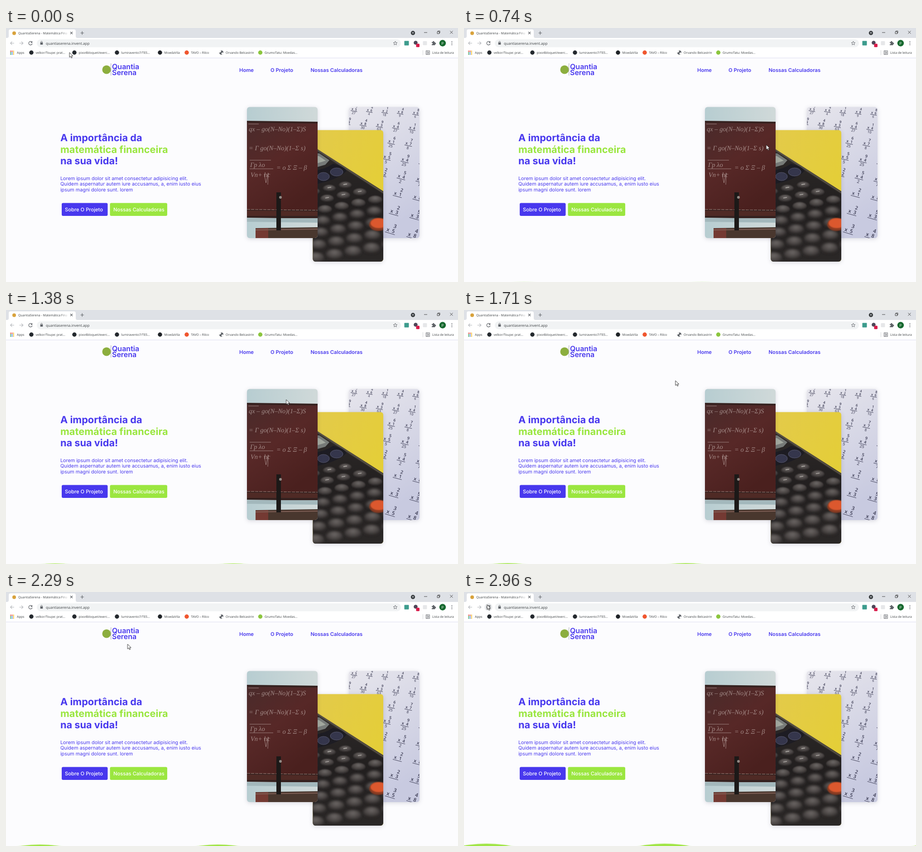
Write an HTML page that moves like this. It is 998x561 px and loops after 3010 ms.

```html
<!DOCTYPE html>
<html lang="pt-BR">
<head>
<meta charset="utf-8">
<title>QuantiaSerena</title>
<style>
  html, body { margin: 0; width: 100%; height: 100%; overflow: hidden; background: #fcfcfe; }
  svg { display: block; width: 998px; height: 561px; }
  text { text-rendering: geometricPrecision; }
  .ui { font: 7px "Open Sans", "Noto Sans", sans-serif; fill: #3c4043; }
  .site { font-family: Inter, "Open Sans", sans-serif; fill: #4838ee; }
  .nav { font-size: 11.25px; font-weight: 600; }
  .title { font-size: 21.75px; font-weight: 700; }
  .body { font-size: 10.8px; }
  .btn { font-size: 11.2px; font-weight: 500; fill: #fff; }
  .brand { font-size: 16px; font-weight: 600; }
  .chalk { font: italic 14.5px "Liberation Serif", "Noto Serif", serif; fill: #d0c0bc; opacity: .65; }
  .sum { font-family: "Open Sans", "Noto Sans", sans-serif; font-weight: 600; fill: #3a3a52; }
  .line { fill: none; stroke: #5f6368; stroke-width: 1.2; }
  .photo { filter: drop-shadow(0 2px 5px rgba(30, 30, 60, .16)); }
</style>
</head>
<body>
<svg viewBox="0 0 998 561">
  <defs>
    <clipPath id="boardClip"><rect x="532" y="174.5" width="156" height="289.5" rx="6"/></clipPath>
    <clipPath id="calcClip"><rect x="677.5" y="225.5" width="155.5" height="290.5" rx="6"/></clipPath>
    <clipPath id="paperClip"><rect x="757" y="174.5" width="156" height="289.5" rx="6"/></clipPath>
    <linearGradient id="wall" x2="1"><stop stop-color="#b7cdd1"/><stop offset="1" stop-color="#d0d9d9"/></linearGradient>
    <linearGradient id="board" x2=".6" y2="1">
      <stop stop-color="#4a2b2b"/><stop offset=".5" stop-color="#572827"/><stop offset="1" stop-color="#4a201e"/>
    </linearGradient>
    <linearGradient id="paper" x2=".3" y2="1"><stop stop-color="#e6e5ec"/><stop offset="1" stop-color="#c8cae0"/></linearGradient>
    <linearGradient id="yellow" x2="1" y2="1"><stop stop-color="#e3ca4b"/><stop offset="1" stop-color="#e5d02f"/></linearGradient>
    <linearGradient id="shell" x2="0" y2="1">
      <stop stop-color="#2e2a29"/><stop offset=".5" stop-color="#221f1f"/><stop offset="1" stop-color="#2b2827"/>
    </linearGradient>
    <radialGradient id="key" cy=".3" r=".7"><stop stop-color="#6d6866"/><stop offset=".6" stop-color="#474241"/><stop offset="1" stop-color="#201d1d"/></radialGradient>
    <linearGradient id="fade" x2="1"><stop stop-color="#fff" stop-opacity="0"/><stop offset="1" stop-color="#fff"/></linearGradient>
    <filter id="soft" x="-30%" y="-30%" width="160%" height="160%"><feGaussianBlur stdDeviation="1"/></filter>
    <filter id="softer" x="-40%" y="-40%" width="180%" height="180%"><feGaussianBlur stdDeviation="2.4"/></filter>
    <filter id="glow" x="-10%" y="-60%" width="120%" height="220%"><feGaussianBlur stdDeviation="1.1"/></filter>
    <path id="hump" d="M-80 11Q0-11 80 11V20H-80Z"/>
  </defs>

  <rect width="998" height="561" fill="#fcfcfe"/>

  <!-- site header -->
  <circle cx="222" cy="92" r="9.5" fill="#8cae3e"/>
  <path d="M231.8 78V105" stroke="#a9a9b8"/>
  <g class="site brand"><text x="234" y="91">Quantia</text><text x="234" y="104.3">Serena</text></g>
  <g class="site nav">
    <text x="515" y="97">Home</text><text x="584" y="97">O Projeto</text><text x="672.5" y="97">Nossas Calculadoras</text>
  </g>

  <!-- introduction -->
  <g class="site title">
    <text x="120" y="250.3">A importância da</text>
    <text x="120" y="275.5" fill="#99e63e">matemática financeira</text>
    <text x="120" y="300.5">na sua vida!</text>
  </g>
  <g class="site body">
    <text x="120" y="336">Lorem ipsum dolor sit amet consectetur adipisicing elit.</text>
    <text x="120" y="348.3">Quidem aspernatur autem iure accusamus, a, enim iusto eius</text>
    <text x="120" y="360.5">ipsum magni dolore sunt. lorem</text>
  </g>
  <rect x="123" y="386.5" width="101.5" height="28.5" rx="3" fill="#4838ee"/>
  <rect x="229.5" y="386.5" width="126.5" height="28.5" rx="3" fill="#9be640"/>
  <text class="site btn" x="130" y="405.2">Sobre O Projeto</text>
  <text class="site btn" x="237" y="405.2">Nossas Calculadoras</text>

  <!-- sheet of sums -->
  <g class="photo"><g clip-path="url(#paperClip)">
    <rect x="757" y="174" width="156" height="290" fill="url(#paper)"/>
    <g id="sums"></g>
  </g></g>

  <!-- calculator -->
  <g class="photo"><g clip-path="url(#calcClip)">
    <rect x="677" y="225" width="157" height="291" fill="url(#yellow)"/>
    <path d="M677 262L688 268L840 365V520H677Z" fill="url(#shell)"/>
    <path d="M677 263L688 270L840 368" fill="none" stroke="#6b6355" stroke-width="2.5" filter="url(#soft)"/>
    <path d="M677 276L692 277L714 292L705 302L677 310Z" fill="#777b78"/>
    <path d="M677 282L691 283L706 293L677 302Z" fill="#a3a99f"/>
    <path d="M677 316Q705 312 722 300Q745 304 752 316Q728 338 677 346Z" fill="#1d1c23"/>
    <g fill="#35364c" stroke="#62647a" stroke-width=".8">
      <ellipse cx="701" cy="328" rx="13" ry="9"/><ellipse cx="730" cy="318" rx="14" ry="9"/>
    </g>
    <g id="keys"></g>
    <ellipse cx="822" cy="434" rx="20" ry="14" fill="#8a3a20" filter="url(#soft)"/>
    <ellipse cx="823" cy="431" rx="18" ry="11" fill="#dc592d" filter="url(#soft)"/>
  </g></g>

  <!-- blackboard -->
  <g class="photo"><g clip-path="url(#boardClip)">
    <rect x="532" y="174" width="156" height="290" fill="url(#wall)"/>
    <path d="M532 205L688 207V421L532 419Z" fill="#35211f"/>
    <path d="M532 209L688 211V401H532Z" fill="url(#board)"/>
    <path d="M532 400.5L688 402.5" stroke="#94736c" stroke-width="1.2" stroke-dasharray="7 2"/>
    <path d="M532 403L688 405V415H532Z" fill="#4f2a25"/>
    <path d="M532 420H688V430L532 428Z" fill="#a3b8bc"/>
    <path d="M551 442L688 440V464H551Z" fill="#49372e"/>
    <path d="M551 443L579 442V464H551Z" fill="#743a33"/>
    <path d="M551 446L688 444" stroke="#816057" stroke-width="2"/>
    <path d="M597 363H607V447H597Z" fill="#1c1918"/>
    <circle cx="606" cy="374" r="3" fill="#918984"/>
    <g class="chalk">
      <text x="536" y="228">qx – go(N–No)(1–Σ)S</text>
      <text x="536" y="270">= Γ go(N–No)(1–Σ s)</text>
      <text x="539" y="307">Γp λo</text><text x="540" y="329">Vn+ hc</text>
      <text x="597" y="313">= o  Σ Ξ  – β</text>
    </g>
    <path d="M535 212H558M538 292H585M538 311H590M570 322L574 342L579 320L578 346" fill="none" stroke="#d0c0bc" opacity=".6"/>
  </g></g>

  <!-- wave at the foot -->
  <g id="wave" fill="#a0e545"></g>

  <!-- browser frame -->
  <rect width="998" height="22" fill="#dee1e6"/>
  <rect y="22" width="998" height="44" fill="#fff"/>
  <path d="M0 66.2H998" stroke="#dcdcf0"/>
  <path d="M2 22Q6 22 6 18V7Q6 3 10 3H150Q154 3 154 7V18Q154 22 158 22Z" fill="#fff"/>
  <circle cx="18" cy="11.5" r="4" fill="#d8a23c"/>
  <text class="ui" x="27" y="13.7">QuantiaSerena - Matemática Fina</text>
  <rect x="121" y="5" width="17" height="14" fill="url(#fade)"/>
  <path class="line" d="M142 8.5L147 13.5M147 8.5L142 13.5M164.5 11H172M168.2 7.2V14.8"/>
  <circle cx="898.5" cy="11" r="4.7" fill="#3c4043"/>
  <path d="M896.3 9.8H900.7L898.5 12.6Z" fill="#dee1e6"/>
  <g fill="none" stroke="#333" stroke-width=".9">
    <path d="M923 10H930M980.5 6.5L986.5 12.5M986.5 6.5L980.5 12.5"/>
    <path d="M952.2 8.2H956.6V12.6H952.2ZM953.6 8V6.6H958V11H956.8"/>
  </g>

  <circle id="hover" cx="54" cy="33.5" r="8.5" fill="#e6e8ea" opacity="0"/>
  <path class="line" d="M18 33.5H10M13.5 29.8L9.8 33.5L13.5 37.2M29.5 33.5H37.5M34 29.8L37.7 33.5L34 37.2" style="stroke:#b4b7bb"/>
  <path class="line" d="M57 31A3.9 3.9 0 1 0 57.9 34.5"/>
  <path d="M58.2 28.8V32.8H54.2Z" fill="#5f6368"/>
  <rect x="68" y="25" width="804" height="17.5" rx="8.7" fill="#f1f3f4"/>
  <rect x="75.7" y="32" width="5.6" height="4.8" rx=".6" fill="#5f6368"/>
  <path class="line" d="M76.9 32V30.8A1.6 1.6 0 0 1 80.1 30.8V32" style="stroke-width:.9"/>
  <text class="ui" x="88" y="36.5" style="font-size:8.1px">quantiaserena.invent.app</text>
  <path class="line" id="star" style="stroke-width:.9"/>
  <rect x="879.5" y="28.5" width="10" height="10" rx="1" fill="#3d9c8d"/>
  <circle cx="904.5" cy="32.5" r="4.3" fill="#4e4658"/>
  <rect x="905.5" y="34.7" width="7.5" height="7.5" rx="1.5" fill="#d81b4a"/>
  <rect x="920.5" y="29" width="9" height="9" rx="1.5" fill="#e6e7e9"/>
  <path d="M940 31H942.3A1.7 1.7 0 1 1 945.5 31H947.3V32.7A1.7 1.7 0 1 1 947.3 36V38H940V35.8A1.5 1.5 0 1 0 940 33Z" fill="#5f6368"/>
  <circle cx="964" cy="33.5" r="7.2" fill="#17692f"/>
  <text class="ui" x="964" y="36.5" text-anchor="middle" style="fill:#fff;font-size:8px">P</text>
  <g fill="#5f6368"><circle cx="984.5" cy="30" r="1"/><circle cx="984.5" cy="33.5" r="1"/><circle cx="984.5" cy="37" r="1"/></g>

  <g id="apps"></g>
  <text class="ui" x="24" y="56.8">Apps</text>
  <g id="marks"></g>
  <path d="M469.3 53Q472 49.5 475 50.5L474 53L471.5 55ZM476 58.5L475 55.5L478.5 54L480 55.5Q479 58.5 476 58.5Z" transform="translate(.4 -.2)" fill="#fff"/>
  <path d="M920.5 49V60" stroke="#d5d7da"/>
  <path class="line" d="M927.3 50.2H935.3V58.6H927.3ZM929.8 50.2V58.6M931 52.7H934M931 54.5H934M931 56.3H934" style="stroke-width:.9"/>
  <text class="ui" x="941" y="56.8">Lista de leitura</text>

  <path id="cursor" d="M0 0V10.6L2.5 8.4L4.3 12.2L6.1 11.3L4.4 7.7H7.7Z" fill="#fff" stroke="#222" stroke-width=".9"/>
</svg>
<script>
  const LOOP = 3010;
  const get = id => document.getElementById(id);

  function add(parent, tag, attrs, text) {
    const node = document.createElementNS("http://www.w3.org/2000/svg", tag);
    for (const name in attrs) node.setAttribute(name, attrs[name]);
    if (text !== undefined) node.textContent = text;
    parent.append(node);
    return node;
  }

  let seed = 11;
  const digit = () => 1 + ((seed = (seed * 16807) % 2147483647) % 9);

  // Sums grow towards the foot of the sheet.
  for (let row = 0; row < 8; row++) {
    for (let col = -4; col < 2; col++) {
      const x = 905 - 7.9 * row + col * (34 + 1.9 * row);
      const y = 187 + 32.5 * row + 0.65 * row * row + col * (2 + 1.2 * row);
      const size = 7.2 + 0.6 * row;
      const sum = add(get("sums"), "g", {
        class: "sum", "font-size": size, "text-anchor": "middle",
        transform: `translate(${x} ${y}) rotate(${10 + row})`
      });
      add(sum, "text", { x: size * 0.6, y: -size * 0.6 }, digit());
      add(sum, "text", { y: size * 0.4 }, "x\u00a0\u00a0" + digit());
      add(sum, "path", { d: `M${-size} ${size * 0.65}H${size}`, stroke: "#3a3a52", "stroke-width": 0.9 });
      if (row < 5) add(sum, "text", { y: size * 1.6, opacity: 0.8 }, digit() * digit());
    }
  }

  // Calculator keys lose focus towards the viewer.
  for (let row = 0; row < 7; row++) {
    for (let col = -1; col < 5; col++) {
      const x = 714 - 5 * row + col * (35 + row);
      const y = 354 + 22 * row + row * row * 0.6 - col * 7;
      if (y < 285 + (x - 688) * 0.65) continue;
      add(get("keys"), "ellipse", {
        cx: x, cy: y, rx: 14 + row * 0.8, ry: 7.5 + row * 0.8,
        fill: "url(#key)", filter: row < 3 ? "url(#soft)" : "url(#softer)"
      });
      if (row < 2) add(get("keys"), "path", { d: `M${x - 4} ${y - 1}l8 -1.5`, stroke: "#b9b5b0", "stroke-width": 1.3 });
    }
  }

  for (const x of [0, 393, 998, 1391]) {
    add(get("wave"), "use", { href: "#hump", x, filter: "url(#glow)", opacity: 0.6 });
    add(get("wave"), "use", { href: "#hump", x });
  }

  const starPoints = Array.from({ length: 10 }, (_, i) => {
    const r = i % 2 ? 2 : 4.5, a = i * Math.PI / 5;
    return `${859.5 + r * Math.sin(a)} ${33.7 - r * Math.cos(a)}`;
  });
  get("star").setAttribute("d", `M${starPoints.join("L")}Z`);

  const appColors = ["#e5463a", "#e5463a", "#f2b91c", "#38a457", "#4285f4", "#f2b91c", "#38a457", "#4285f4", "#f2b91c"];
  appColors.forEach((fill, i) => add(get("apps"), "rect", {
    x: 9.2 + (i % 3) * 3.2, y: 50.2 + Math.floor(i / 3) * 3.2, width: 2.2, height: 2.2, fill
  }));

  const marks = [
    [56, "#24292e", "velkor/Toupe: prat..."],
    [151, "#24292e", "pixo4bloquet/exerc..."],
    [245, "#24292e", "lumiravento7/TES..."],
    [340, "#1f2327", "MoedaVila"],
    [399, "#f0562f", "TAVO – Rilco"],
    [475.5, "#5f6368", "Orvando Belcastrin"],
    [561.5, "#8cc63e", "GrumoTatu: Moedas..."]
  ];
  for (const [cx, fill, label] of marks) {
    add(get("marks"), "circle", { cx, cy: 54.3, r: 4.7, fill });
    add(get("marks"), "text", { class: "ui", x: cx + 9.6, y: 56.8 }, label);
  }

  // Time, x, y of the pointer tip.
  const path = [
    [0, 140, 54], [50, 141, 55], [150, 205, 98], [300, 358, 188], [420, 490, 246], [540, 588, 267],
    [640, 636, 264], [740, 667, 258], [900, 712, 250], [1050, 741, 246], [1200, 720, 235],
    [1400, 608, 194], [1600, 496, 160], [1710, 467, 156], [1880, 444, 154], [2020, 422, 152],
    [2160, 362, 147], [2300, 262, 113], [2430, 158, 77], [2560, 82, 55], [2690, 59, 38],
    [2800, 51, 27], [2960, 51, 28], [LOOP, 51, 28]
  ];
  const move = (x, y) => `translate(${x}px, ${y}px)`;
  const play = (id, frames) => get(id).animate(frames, { duration: LOOP, iterations: Infinity });

  play("cursor", path.map(([t, x, y]) => ({ offset: t / LOOP, transform: move(x, y) })));

  // The wave drifts left while it rises into view.
  play("wave", Array.from({ length: 21 }, (_, i) => {
    const p = i / 20;
    return { offset: p, transform: move(160 - 112 * p, 562 - 6.1 * p ** 1.5) };
  }));

  play("hover", [
    { offset: 0, opacity: 0 }, { offset: 0.89, opacity: 0 },
    { offset: 0.93, opacity: 1 }, { offset: 1, opacity: 1 }
  ]);
</script>
</body>
</html>
```
